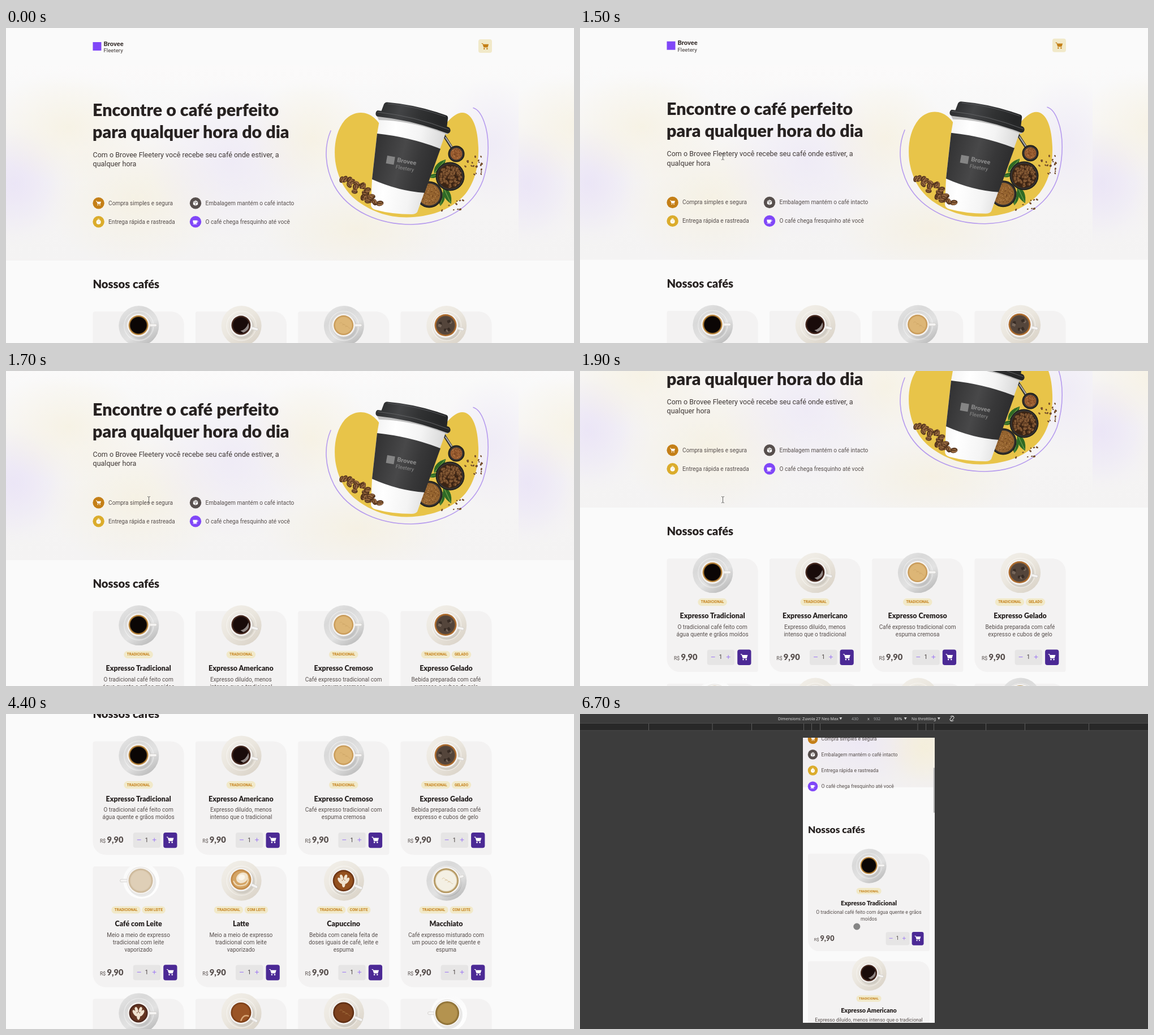
These frames come from a looping animation (1004x558 px, 8000 ms). An HTML page:

```html
<!DOCTYPE html>
<html lang="pt-BR">
<head>
<meta charset="utf-8">
<title>Cafés</title>
<style>
html, body { margin: 0; width: 100%; height: 100%; overflow: hidden; background: #fafafa; }
svg { display: block; }
text { font-family: Roboto, sans-serif; white-space: pre; }
.h { font-family: Lato, "Open Sans", sans-serif; font-weight: 900; }
.b { font-weight: 700; }
.ui { font-family: "Noto Sans", "Open Sans", sans-serif; }
.m { text-anchor: middle; }
</style>
</head>
<body>
<svg id="stage" width="100%" height="100%" viewBox="0 0 1004 558"></svg>
<script>
const PURPLE = '#8047f8', AMBER = '#c47f17', GOLD = '#dbac2c', INK = '#272221', GREY = '#574f4d';
const rnd = (s => () => (s = s * 16807 % 2147483647) / 2147483647)(7);

const text = (x, y, s, size, fill, cls = '') =>
  `<text x="${x}" y="${y}" font-size="${size}" fill="${fill}" class="${cls}">${s}</text>`;
const rect = (x, y, w, h, fill, r = 0) =>
  `<rect x="${x}" y="${y}" width="${w}" height="${h}" rx="${r}" fill="${fill}"/>`;
const circle = (x, y, r, fill, more = '') => `<circle cx="${x}" cy="${y}" r="${r}" fill="${fill}" ${more}/>`;
const oval = (x, y, rx, ry, fill, rot = 0) =>
  `<ellipse rx="${rx}" ry="${ry}" fill="${fill}" transform="translate(${x} ${y}) rotate(${rot})"/>`;
const path = (d, fill, more = '') => `<path d="${d}" fill="${fill}" ${more}/>`;
const line = (d, color, w, more = '') => path(d, 'none', `stroke="${color}" stroke-width="${w}" stroke-linecap="round" ${more}`);
const group = (x, y, s, body, rot = 0) =>
  `<g transform="translate(${x} ${y}) rotate(${rot}) scale(${s})">${body}</g>`;
const times = (n, f) => Array.from({ length: n }, (_, i) => f(i)).join('');

const linear = (id, x2, y2, ...colors) => `<linearGradient id="${id}" x2="${x2}" y2="${y2}">` +
  colors.map((c, i) => `<stop offset="${i / (colors.length - 1)}" stop-color="${c}"/>`).join('') + '</linearGradient>';
const glow = (id, c, a) => `<radialGradient id="${id}"><stop stop-color="${c}" stop-opacity="${a}"/>` +
  `<stop offset=".5" stop-color="${c}" stop-opacity="${a / 2}"/><stop offset="1" stop-color="${c}" stop-opacity="0"/></radialGradient>`;

// [saucer, cup x, cup y, coffee radius, rim colour, coffee colour, handle x, handle y, topping]
const cups = [
  ['G', 0, -1, 17.5, '#c08a3e', '#0b0605', 30, -1],
  ['C', 0, -1, 17, '#4a2c22', '#190b0a', 28, 6, 'glint'],
  ['G', 0, -1, 17.5, '#c89a58', '#ddb676', 30, -1, 'foam'],
  ['C', -1, -1, 19.5, '#b06d2d', '#54453b', 29, 6, 'ice'],
  ['W', 4, 0, 21.5, '#cdb99b', '#dfcfb7', -30, 0],
  ['C', 0, -2, 18, '#c08745', '#d4a465', 27, 11, 'swirl'],
  ['C', 0, 0, 19, '#6d3514', '#94511f', 31, 13, 'leaf'],
  ['G', 0, 0, 22, '#b3965e', '#f4f0e4', 29, -8, 'foam'],
  ['G', 0, 0, 16.5, '#4a251a', '#653622', 30, 0, 'leaf'],
  ['C', 0, -1, 18, '#7d3f17', '#9a5425', 27, 14, 'arc'],
  ['C', 0, -1, 18.5, '#5d2d12', '#7f431f', 31, 12, 'foam'],
  ['W', 2, 0, 21, '#8e7136', '#b4934f', -30, 0]
];
const coffeeFill = ([, , , , rim, fill], i) => `<radialGradient id="coffee${i}"><stop offset=".8" stop-color="${fill}"/>` +
  `<stop offset=".92" stop-color="${rim}"/></radialGradient>`;

const defs = '<defs>' + cups.map(coffeeFill).join('') +
  linear('saucerG', .7, 1, '#e9e9e9', '#d9d9d9', '#e2e2e2', '#bdbdbd') +
  linear('saucerC', .8, 1, '#f3f0ea', '#ebe7df', '#dad3c8') +
  linear('saucerW', 1, 1, '#f8f8f8', '#ffffff') +
  linear('lid', 1, .2, '#2b2c2d', '#434446', '#303132', '#252627') +
  linear('sleeve', 1, .25, '#2e2e2f', '#3b3b3c', '#484849', '#383839', '#2d2d2e') +
  linear('paper', 1, .25, '#efefef', '#ffffff', '#f4f4f4', '#d6d6d6') +
  linear('base', 0, 1, '#fafafa', '#f6f5f5', '#f4f3f3') +
  glow('y', '#f6eed4', .5) + glow('p', '#e8e1f7', .5) + glow('w', '#fbfafa', 1) +
  '<clipPath id="screen"><rect x="394" y="42" width="233" height="505"/></clipPath></defs>';

const cart = (x, y, s, c) => group(x, y, s,
  path('M-6.4-5.6h2.3l.7 1.9h9.6l-1.8 5.8h-7l-2.2-6.5h-1.6z', c) + circle(-1.7, 4.3, 1.3, c) + circle(3.4, 4.3, 1.3, c));

const icons = [
  () => cart(0, 0, .72, '#fff'),
  c => path('M0-4.8l4.2 2.3v5L0 4.8l-4.2-2.3v-5z', '#fff') + line('M-4-2.4L0-.1L4-2.4M0 0v4.5M-2-3.6L2-1.3', c, .7),
  c => circle(0, .6, 4, '#fff') + line('M-1.3-4.4h2.6', '#fff', 1) + line('M0 .6l1.6-1.6', c, .8),
  () => path('M-4.6-2.5h7.4v1.2c0 3-1 4.8-2.5 4.8h-2.4c-1.5 0-2.5-1.8-2.5-4.8z', '#fff') +
    line('M2.9-1.7c2.3-.3 2.3 2.6-.6 2.6', '#fff', 1) + line('M-4.4 4.2h6.8', '#fff', .8)
];
const features = [
  ['Compra simples e segura', AMBER], ['Embalagem mantém o café intacto', GREY],
  ['Entrega rápida e rastreada', GOLD], ['O café chega fresquinho até você', PURPLE]
];
const feature = (i, x, y, s) => group(x, y, s,
  circle(0, 0, 10.2, features[i][1]) + icons[i](features[i][1]) + text(17.5, 3.3, features[i][0], 10.07, GREY));

// Soft backdrop tile, 906 wide
const backdrop = x => `<svg x="${x}" y="66" width="906" height="346">` + rect(0, 0, 906, 346, 'url(#base)') +
  oval(15, 210, 80, 90, 'url(#p)') + oval(15, 210, 110, 110, 'url(#p)') + oval(110, 110, 140, 100, 'url(#y)') +
  oval(230, 240, 160, 120, 'url(#y)') + oval(400, 170, 150, 140, 'url(#p)') + oval(540, 130, 110, 110, 'url(#y)') +
  oval(620, 290, 170, 80, 'url(#y)') + oval(860, 140, 90, 120, 'url(#p)') +
  oval(450, 0, 600, 50, 'url(#w)') + '</svg>';

const bean = (x, y, s, rot) => group(x, y, s,
  oval(0, 0, 6.4, 4.5, '#56351e') + oval(-.4, -.7, 5.2, 3.2, '#96683f') + line('M-5 .3Q-1-1.4 0 0T5-.4', '#38200f', 1), rot);

const bowl = (x, y, r, fill) => circle(x, y, r, '#1c1b1b') + circle(x, y, r - 1.5, '#34312f') + circle(x, y, r - 4, fill);
const grains = (x, y, r, n, s, make) => times(n, () => {
  const a = rnd() * 6.283, d = Math.sqrt(rnd()) * r;
  return make(x + Math.cos(a) * d, y + Math.sin(a) * d, s, rnd() * 180);
});
const speck = (x, y, s) => circle(x, y, s, rnd() < .5 ? '#c08a55' : '#6b3d1c');

function art() {
  const blob = 'M668 185C655 149 622 139 599 163C583 182 579 210 582 236C586 263 597 287 618 304C643 324 674 335.500 708 335.500C750 335 788 322 812 294C830 271 836 240 835 212C834 180 826 150 806 150C792 150 776 170 766 186Z';
  const leaf = (x, y, rot, s) => group(x, y, s, path('M-16 0Q-4-13 16 0Q-2 11-16 0z', '#2f6a25') + line('M-14 0H13', '#7ba653', 1), rot);
  return path(blob, '#e8c449') +
    line('M574 182C562 210 563 246 580 279C605 325 660 348 716 348C775 347 825 318 843 270C856 230 854 190 845 166C840 152 834 144 826 141.500', '#b69bee', 1.6) +
    times(20, () => bean(796 + rnd() * 48, 226 + rnd() * 36, .2 + rnd() * .17, rnd() * 180)) +
    times(12, () => bean(762 + rnd() * 46, 300 + rnd() * 24, .2 + rnd() * .2, rnd() * 180)) +
    leaf(767, 245, -50, 1) + leaf(780, 297, 65, 1) + leaf(770, 303, 100, .8) + leaf(757, 262, -15, .6) +
    line('M774 190L788 212', '#333', 5) + line('M777 194L789 212', '#b5b5b5', 2) +
    bowl(796, 223, 14.5, '#9a5c30') + grains(796, 223, 9, 40, .7, speck) +
    bowl(785, 263, 25.5, '#3a2415') + grains(785, 263, 19, 75, .5, bean) +
    bowl(748, 295, 23.5, '#95642f') + grains(748, 295, 17, 80, .8, speck) +
    path('M661 158L778 184L727 326Q724 330 717 330Q682 330 653 322Q646 320 645 314L647 268L656 187Z', 'url(#paper)') +
    path('M656 187Q714 193 768 214L740 292Q694 289 647 268Z', 'url(#sleeve)') +
    path('M655 155Q720 158 783 185L780 189Q718 164 659 163Z', '#bfbfbf') +
    path('M674 131.500Q727 136 779 155Q782 157 781 161L779 178L662 151L668 135Q670 131 674 131.500Z', 'url(#lid)') +
    path('M657 146Q724 153 783 176Q787 179 785 184Q783 188 778 186Q718 163 658 157Q653 156 653.500 151Q654 147 657 146Z', 'url(#lid)') +
    line('M657 149Q722 156 783 180', '#606163', 1) + line('M675 134Q727 139 777 157', '#55565a', 1) +
    group(674, 226, 1, rect(0, 0, 14, 14, '#858585') + text(18.5, 8, 'Brovee', 10.8, '#8b8b8b', 'h') + text(18, 20, 'Fleetery', 9.3, '#8b8b8b'), 10) +
    times(25, () => {
      const u = rnd();
      return bean(592 + u * 71, 267 + u * 44 + (rnd() - .5) * 25 * Math.sin(u * 3.14), .85 + rnd() * .25, rnd() * 180);
    });
}

const toppings = {
  glint: path('M-1 10Q9 8 13-4Q17 8 4 13Z', '#b9b3b0', 'opacity=".75"'),
  foam: times(3, i => line(`M${-7 + i * 5} ${i * 3 - 3}q2-4 5 0t4 2`, '#c39a5c', .7, 'opacity=".6"')),
  ice: times(7, i => group(Math.sin(i * 2.2) * 10, Math.cos(i * 2.2) * 9, 1, rect(-3, -3, 6, 5, i % 2 ? '#76665a' : '#382c25', 1), i * 40)),
  swirl: oval(2, -3, 11, 9, '#f1e4cf', -30) + line('M-13 3Q-8 15 8 9Q14 4 12-3', '#efdcbc', 2) + oval(1, -4, 6, 5, '#fbf5ea', -20),
  leaf: [-1, 1].map(k => oval(k * 3.5, -6, 2.6, 5, '#f0e3d0', k * 20) + oval(k * 6, 0, 3, 6.5, '#f0e3d0', k * 35)).join('') + oval(0, 5, 3, 7, '#f0e3d0'),
  arc: line('M0 14Q4 3 13 6', '#d9a878', 2.5)
};
function cup(i) {
  const [s, x, y, r, , , hx, hy, top] = cups[i];
  const handle = `M${x} ${y}L${hx} ${hy}`;
  return circle(s == 'W' ? 5 : .7, 0, s == 'W' ? 32 : 35.5, `url(#saucer${s})`) +
    circle(.7, 0, 26, 'none', 'stroke="#fff" stroke-width="1.2" opacity=".45"') +
    oval(x + 2, y + 3, r + 4, r + 4, '#00000014') +
    line(handle, '#cfcdca', 5.5) + line(handle, '#f5f4f3', 4) +
    circle(x, y, r + 2.8, '#f5f3f1', 'stroke="#dcd9d5" stroke-width=".6"') +
    circle(x, y, r, `url(#coffee${i})`) + (top ? group(x, y, 1, toppings[top]) : '');
}

const tagWidth = { TRADICIONAL: 51.5, GELADO: 34.5, 'COM LEITE': 41.5 };
function tags(list, cx) {
  let x = cx - (list.reduce((sum, s) => sum + tagWidth[s], 0) + 2.5 * (list.length - 1)) / 2;
  return list.map(s => {
    const w = tagWidth[s], out = rect(x, 70.4, w, 13.2, '#f1e9c9', 6.6) + text(x + w / 2, 79.2, s, 6.3, AMBER, 'b m');
    x += w + 2.5;
    return out;
  }).join('');
}

function card(i, w, name, labels, lines) {
  const h = 175 + 13 * lines.length, c = w / 2, y = h - 26;
  return path(`M4 0H${w - 23}a23 23 0 0 1 23 23V${h - 4}a4 4 0 0 1-4 4H23a23 23 0 0 1-23-23V4a4 4 0 0 1 4-4z`, '#f3f2f2') +
    group(c, 25.3, 1, cup(i)) + tags(labels, c) + text(c, 106, name, 12.5, INK, 'h m') +
    lines.map((s, k) => text(c, 124.5 + 13 * k, s, 10.07, GREY, 'm')).join('') +
    text(12.5, y + 4.7, 'R$', 8.7, GREY) + text(25, y + 4.7, '9,90', 14.7, GREY, 'h') +
    rect(w - 90, y - 13.5, 48.5, 27, '#e6e5e5', 4) + text(w - 66, y + 3, '1', 10.07, '#403937', 'm') +
    line(`M${w - 82.5} ${y - .7}h6M${w - 55.5} ${y - .7}h6m-3-3v6`, '#9a74f3', 1) +
    rect(w - 36.5, y - 13.7, 24.3, 27.4, '#4b2995', 4) + cart(w - 24.4, y - .5, 1, '#fff');
}

const T = 'TRADICIONAL', L = 'COM LEITE';
const menu = [
  ['Expresso Tradicional', [T], ['O tradicional café feito com', 'água quente e grãos moídos']],
  ['Expresso Americano', [T], ['Expresso diluído, menos', 'intenso que o tradicional']],
  ['Expresso Cremoso', [T], ['Café expresso tradicional com', 'espuma cremosa']],
  ['Expresso Gelado', [T, 'GELADO'], ['Bebida preparada com café', 'expresso e cubos de gelo']],
  ['Café com Leite', [T, L], ['Meio a meio de expresso', 'tradicional com leite', 'vaporizado']],
  ['Latte', [T, L], ['Meio a meio de expresso', 'tradicional com leite', 'vaporizado']],
  ['Capuccino', [T, L], ['Bebida com canela feita de', 'doses iguais de café, leite e', 'espuma']],
  ['Macchiato', [T, L], ['Café expresso misturado com', 'um pouco de leite quente e', 'espuma']],
  ...Array(4).fill(['', [], []])
];
const rows = [502.3, 723.7, 958.3];

const desktop = backdrop(0) + backdrop(906) +
  rect(153.5, 25, 15, 15, PURPLE) + text(172.5, 31.5, 'Brovee', 11, '#403937', 'h') + text(172.5, 43.3, 'Fleetery', 9.7, '#403937') +
  rect(835, 20, 24, 24, '#f1e9c9', 4) + cart(847, 32.5, 1, AMBER) +
  text(153, 155.5, 'Encontre o café perfeito', 30.4, INK, 'h') + text(153, 194.5, 'para qualquer hora do dia', 30.4, INK, 'h') +
  text(153.5, 228.7, 'Com o Brovee Fleetery você recebe seu café onde estiver, a', 12.55, '#403937') +
  text(153.5, 245, 'qualquer hora', 12.55, '#403937') +
  times(4, i => feature(i, i % 2 ? 335 : 163.6, i < 2 ? 310.3 : 343.2, 1)) + art() +
  text(153.5, 461, 'Nossos cafés', 20.2, INK, 'h') +
  menu.map((m, i) => group(153.5 + i % 4 * 181.3, rows[i >> 2], 1, card(i, 161.2, ...m))).join('');

const phone =
  '<svg x="394" y="-80" width="233" height="148.500">' + rect(0, 0, 233, 149, '#f2f0f1') +
  oval(100, 70, 130, 80, 'url(#p)') + oval(215, 70, 90, 90, 'url(#y)') + oval(215, 80, 60, 60, 'url(#y)') + '</svg>' +
  times(4, i => feature(i, 411.5, [-17, 10.6, 38.8, 67][i], .86)) +
  text(403, 150.3, 'Nossos cafés', 17.3, INK, 'h') +
  group(403, 186.2, .86, card(0, 250, menu[0][0], [T], ['O tradicional café feito com água quente e grãos', 'moídos'])) +
  group(403, 376.7, .86, card(1, 250, menu[1][0], [T], ['Expresso diluído, menos intenso que o tradicional']));

const arrowDown = x => path(`M${x} 6h5l-2.500 4.200z`, '#d6d6d6');
const label = (x, s, c = '#dadada') => text(x, 10.7, s, 7.1, c, 'ui');
const devtools = rect(0, 0, 1004, 558, '#3c3c3c') + rect(0, 16.5, 1004, 12.5, '#282828') +
  rect(0, 16, 1004, .8, '#505050') + rect(0, 28.7, 1004, .8, '#505050') +
  [121, 233.5, 303, 395, 409, 424, 596.5, 611, 625, 717, 786, 899].map(x => rect(x, 17, 1, 12, '#5c5c5c')).join('') +
  label(350, 'Dimensions: Zuvola 27 Neo Max') + arrowDown(458.3) + label(480, '430', '#a0a3a6') + label(508, 'x', '#c0c0c0') +
  label(519, '932', '#a0a3a6') + label(555.5, '86%') + arrowDown(572.7) + label(586, 'No throttling') + arrowDown(631.8) +
  group(657.5, 8, 1, '<rect x="-2" y="-4" width="4" height="8" rx="1" fill="none" stroke="#d0d0d0"/>' +
    line('M-4.500-1A4.500 4.500 0 0 1 0-5M4.500 1A4.500 4.500 0 0 1 0 5', '#d0d0d0', .9), 40);

const stage = document.getElementById('stage');
stage.innerHTML = defs +
  `<g id="wide">${rect(0, 0, 1004, 558, '#fafafa')}<g id="page">${desktop}</g></g>` +
  path('M0 0v10.500l2.500-2.400 1.700 3.700 1.600-.7-1.700-3.600h3.400z', '#222', 'id="arrow" stroke="#fff" stroke-width=".6"') +
  line('M-2-5.500q2 0 2 1.200q0-1.200 2-1.200M0-4.300v8.600M-2 5.500q2 0 2-1.200q0 1.200 2 1.200', '#555', .9, 'id="beam"') +
  `<g id="narrow">${devtools}<g clip-path="url(#screen)">${rect(394, 42, 233, 505, '#fafafa')}<g id="screenPage">${phone}</g></g>` +
  `<rect id="thumb" x="624.700" width="2.300" height="79.500" fill="#b9b9b9"/>` +
  circle(489.3, 376.5, 5.6, '#858585', 'stroke="#757575" stroke-width=".7"') + '</g>';

const $ = id => document.getElementById(id);
const show = (id, on) => $(id).style.display = on ? '' : 'none';
const move = (id, x, y) => $(id).setAttribute('transform', `translate(${x} ${y})`);
const at = (list, k) => list[Math.max(0, Math.min(list.length - 1, k))];

function draw(t) {
  const k = Math.floor(t / 100), narrow = k >= 65;
  show('wide', !narrow);
  show('narrow', narrow);

  const scroll = k >= 44 ? 453.7 : at([0, 1.3, 32, 77, 126, 170, 204, 222, 227], k - 14);
  move('page', 0, -scroll);

  const u = Math.min(1, Math.max(0, (k - 2) / 6)), e = 1 - (1 - u) ** 1.6;
  const x = 102.5 + 150 * e, y = 45.5 + 182.5 * e;
  const overText = x > 153 && (y > 125 && y < 205 || y > 215);
  const visible = k >= 2 && k < 44;
  show('arrow', visible && !overText);
  show('beam', visible && overText);
  move('arrow', x, y);
  move('beam', x, y);

  const pull = at([0, 40, 61.2], k - 65);
  move('screenPage', 0, pull);
  $('thumb').setAttribute('y', 105 - pull / 6.3);
}

function loop() {
  draw(performance.now() % 8000);
  requestAnimationFrame(loop);
}
loop();
</script>
</body>
</html>
```
